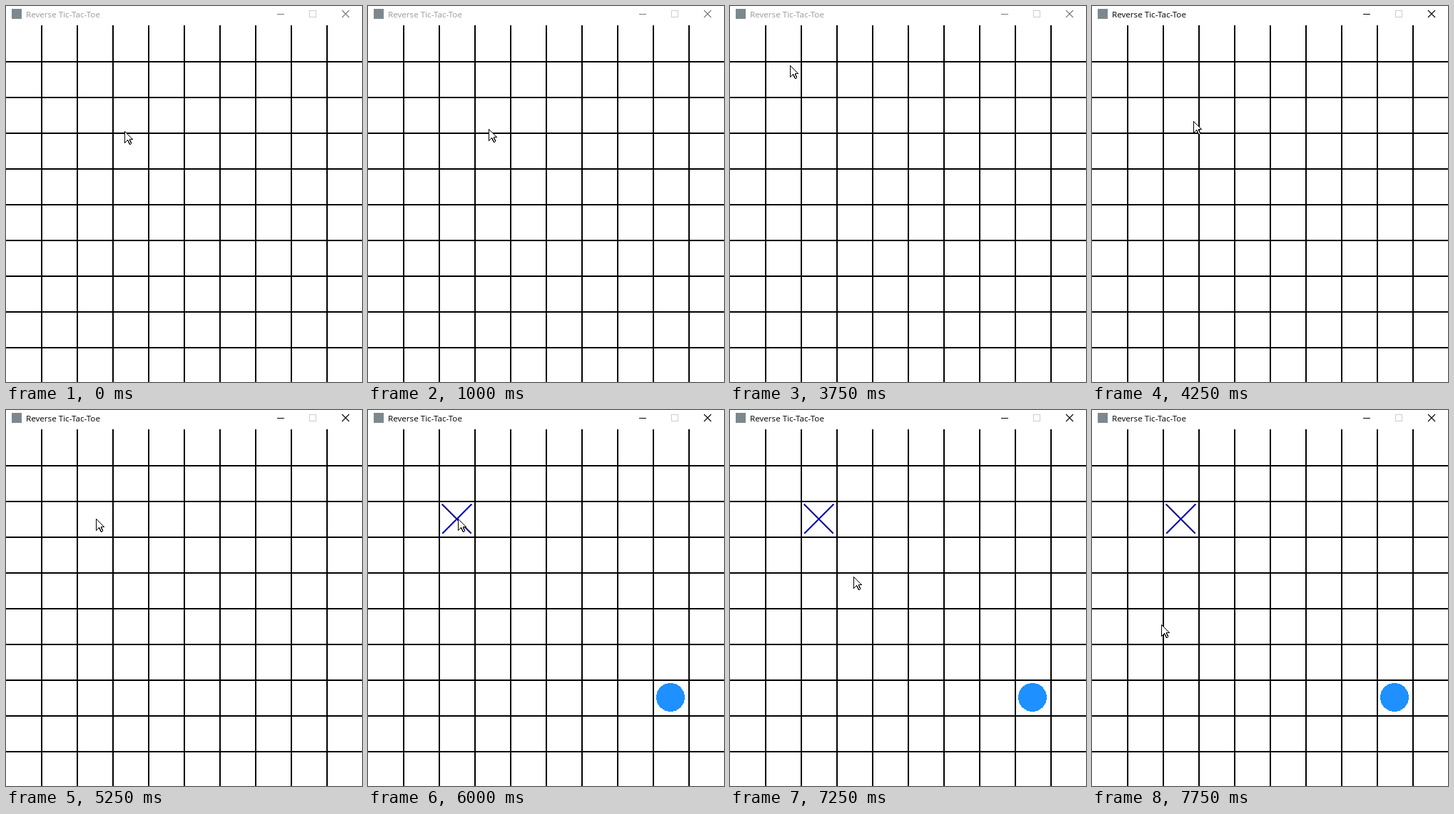
An HTML page that plays this animation: 499 by 526 pixels, repeating every 8000 ms.

```html
<!DOCTYPE html>
<html lang="en">
<head>
<meta charset="utf-8">
<title>Reverse Tic-Tac-Toe</title>
<style>
  html, body { margin: 0; width: 100%; height: 100%; overflow: hidden; background: #fff; }
  svg { display: block; }
  text { font: 11.65px "Open Sans", "Noto Sans", sans-serif; }
  .crisp { shape-rendering: crispEdges; }
</style>
</head>
<body>
<svg width="499" height="526" viewBox="0 0 499 526">
  <rect x="8" y="4" width="14" height="14" fill="#7d888e"/>
  <text id="title" x="28" y="16">Reverse Tic-Tac-Toe</text>
  <g id="buttons" fill="none">
    <path class="crisp" d="M380 11.5H390"/>
    <path d="M471 6L481 16M481 6L471 16" stroke-width="1.1"/>
  </g>
  <rect x="425.5" y="6.5" width="9" height="9" fill="none" stroke="#ccc"/>
  <path id="grid" class="crisp" stroke="#000" stroke-width="2"/>
  <g id="marks" class="crisp">
    <path d="M104 132L145 173M145 132L104 173" stroke="#0000aa" stroke-width="2.1"/>
    <circle cx="424" cy="402" r="20" fill="#1e90ff"/>
  </g>
  <path id="cursor" class="crisp" fill="#fff" stroke="#000" stroke-linejoin="bevel"
        d="M.5 .5V16.5L4.5 12.5L7.5 18.5H8.5L9.5 17.5V16.5L7.5 12.5V11.5H11.5Z"/>
</svg>
<script>
const DURATION = 8000, STEP = 250, FOCUS_AT = 4250, MOVE_AT = 6000;
const $ = id => document.getElementById(id);

const smooth = p => p * p * (3 - 2 * p);
const easeIn = p => p ** 3;
const easeOut = p => 1 - (1 - p) ** 3;

// Hand strokes: the cursor rests between them.
const start = { x: 166, y: 175 };
const strokes = [
  { from: 0, to: 1000, x: 169, y: 172 },
  { from: 2750, to: 3500, x: 84, y: 83 },
  { from: 3750, to: 4000, x: 142, y: 161 },
  { from: 4250, to: 4500, x: 198, y: 237 },
  { from: 4500, to: 5250, x: 126, y: 152 },
  { from: 6000, to: 6250, x: 144, y: 171 },
  { from: 6250, to: 6750, x: 135, y: 270, ease: easeOut },
  { from: 6750, to: 7000, x: 173, y: 233 },
  { from: 7250, to: 7750, x: 97, y: 300, ease: easeIn }
];

function cursorAt(t) {
  let { x, y } = start;
  for (const { from, to, ease = smooth, ...end } of strokes) {
    const p = ease(Math.min(1, Math.max(0, (t - from) / (to - from))));
    x += (end.x - x) * p;
    y += (end.y - y) * p;
  }
  return [x, y].map(Math.round);
}

let lines = '';
for (let i = 1; i < 10; i++) lines += `M${i * 50} 27V526M0 ${28 + i * 50}H499`;
$('grid').setAttribute('d', lines);

function draw(now) {
  const t = Math.floor(now % DURATION / STEP) * STEP;
  const focused = t >= FOCUS_AT;
  $('cursor').setAttribute('transform', `translate(${cursorAt(t)})`);
  $('title').setAttribute('fill', focused ? '#000' : '#999');
  $('buttons').setAttribute('stroke', focused ? '#000' : '#777');
  $('marks').setAttribute('visibility', t >= MOVE_AT ? 'visible' : 'hidden');
}

const began = performance.now();
function tick() {
  draw(performance.now() - began);
  requestAnimationFrame(tick);
}
tick();
</script>
</body>
</html>
```
